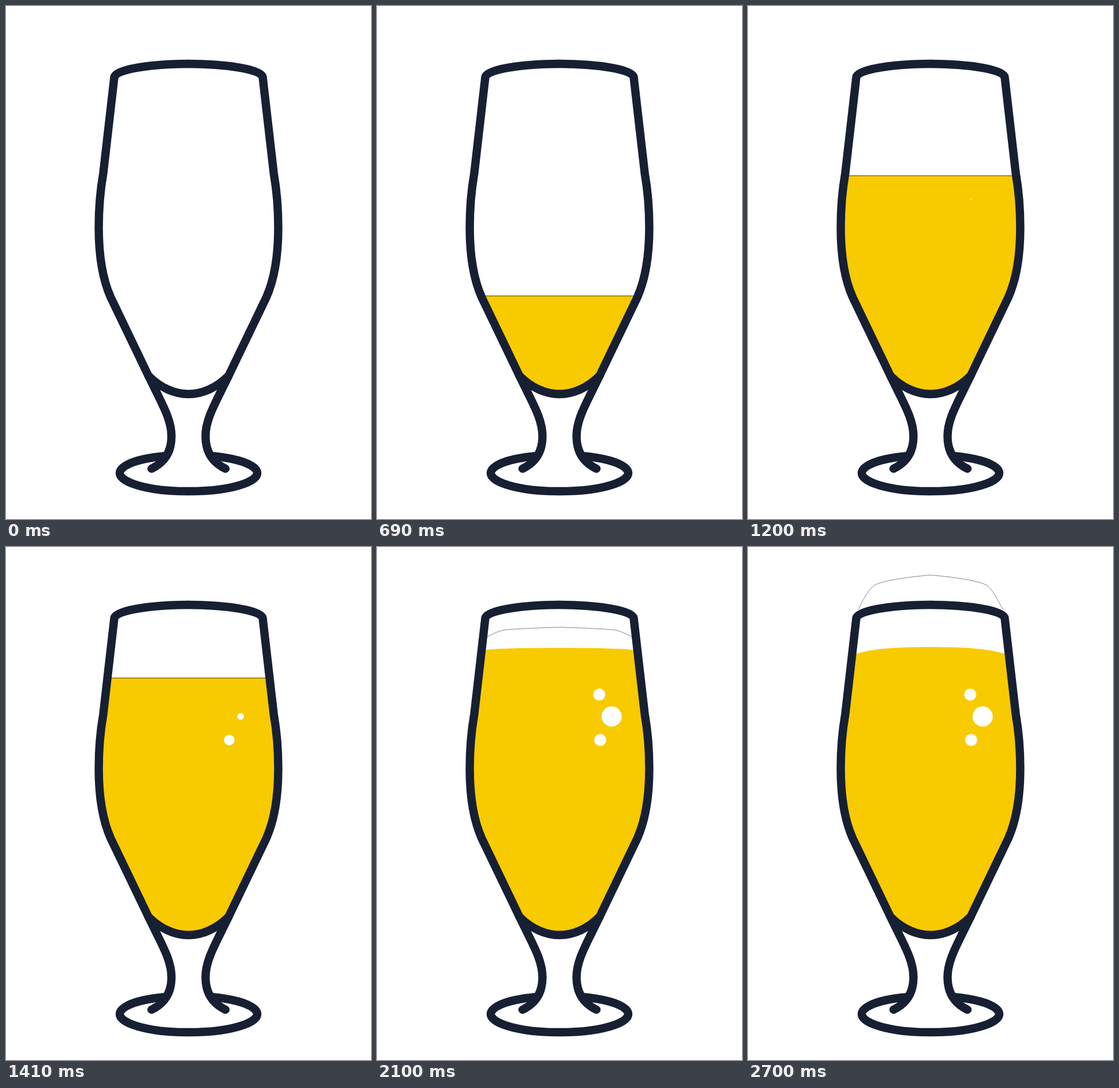
Recreate the animation shown at these times as an HTML page. Size 632x887 px, loop 3600 ms.

```html
<!DOCTYPE html>
<html lang="en">
<head>
<meta charset="utf-8">
<title>Filling beer glass</title>
<style>
  html, body { margin: 0; width: 100%; height: 100%; overflow: hidden; background: #fff; }
  svg { display: block; width: 632px; height: 887px; }
  .glass { fill: none; stroke: #171f33; stroke-width: 14.4; stroke-linecap: round; stroke-linejoin: round; }
  .hair { fill: none; stroke: #1c1c1c; }
</style>
</head>
<body>
<svg viewBox="0 0 632 887">
  <defs>
    <path id="bowl" d="M317 100H316C250 100 188.5 110 187.5 123L168.3 290C163 320 160.6 350 160.6 383C160.6 430 167 472 181.4 504L246.4 639C267 660 292 671 316 671H317Z"/>
    <clipPath id="inside">
      <use href="#bowl"/>
      <use href="#bowl" transform="matrix(-1 0 0 1 632 0)"/>
    </clipPath>
    <g id="half">
      <path d="M316 100C250 100 188.5 110 187.5 123L168.3 290C163 320 160.6 350 160.6 383C160.6 430 167 472 181.4 504L246.4 639C267 660 292 671 316 671"/>
      <path d="M246.4 639L256.8 660C270 688 286.5 715 286.5 744C286.5 768 277 788 252 800"/>
    </g>
  </defs>
  <g clip-path="url(#inside)">
    <path id="beer" fill="#f8ca00"/>
    <path id="level" class="hair" stroke-width=".8"/>
  </g>
  <g id="bubbles" fill="#fff"></g>
  <path id="foam" class="hair" stroke-width=".55"/>
  <g class="glass">
    <path stroke-linecap="butt" d="M277 777.8A119 31.5 0 1 0 355 777.8"/>
    <use href="#half"/>
    <use href="#half" transform="matrix(-1 0 0 1 632 0)"/>
  </g>
</svg>
<script>
  const LOOP = 3600, STEP = 30, HOLD = 60, LAST = 89;
  const $ = id => document.getElementById(id);
  const clamp = v => Math.max(0, Math.min(1, v));

  // step, surface height, rise per step
  const RISE = [
    [0, 665, 1.5], [15, 578, 9.8], [18, 547, 10.8], [28, 426, 12.4],
    [36, 327, 12], [39, 293, 11], [54, 178, 3.8], [55, 175, 2.2]
  ];
  // x, y, radius, first step, last step
  const BUBBLES = [
    [386.5, 333.7, 10.4, 38, 47],
    [406.3, 293, 17.5, 43, 52],
    [384.8, 255.2, 10.4, 47, 56]
  ];
  const dots = BUBBLES.map(([x, y]) => {
    const c = document.createElementNS("http://www.w3.org/2000/svg", "circle");
    c.setAttribute("cx", x);
    c.setAttribute("cy", y);
    return $("bubbles").appendChild(c);
  });

  function surface(k) {
    const i = RISE.findIndex(r => r[0] >= k);
    if (i < 0) return 175;
    if (i === 0) return RISE[0][1];
    const [k0, y0, v0] = RISE[i - 1], [k1, y1, v1] = RISE[i];
    const h = k1 - k0, u = (k - k0) / h, w = 1 - u;
    return y0 * w * w * (1 + 2 * u) + y1 * u * u * (3 - 2 * u)
      - h * v0 * u * w * w + h * v1 * u * u * w;
  }

  function foamPath(e) {
    const at = (x, y) => `${x} ${175 + (y - 175) * e} `;
    const l = 189 + 2 * e, r = 632 - l;
    return "M" + at(l, 108) +
      "C" + at(201, 88) + at(210, 70) + at(222, 64.5) +
      "C" + at(239, 57) + at(285, 51) + at(316, 48.5) +
      "C" + at(347, 51) + at(393, 57) + at(410, 64.5) +
      "C" + at(422, 70) + at(431, 88) + at(r, 108);
  }

  function draw(t) {
    const k = t < HOLD ? 0 : Math.min(LAST, Math.floor((t - HOLD) / STEP) + 1);
    const y = surface(k);
    const e = (1 - Math.cos(Math.PI * clamp((k - 57.8) / 31.2))) / 2;
    const edge = y + 10 * e, mid = y - 2 * e, bend = y + 0.5 * e;

    $("beer").setAttribute("d", k ? `M150 ${edge}H187C217 ${bend} 257 ${mid} 316 ${mid}` +
      `S415 ${bend} 445 ${edge}H482V680H150Z` : "");
    $("level").setAttribute("d", k && !e ? `M150 ${y + 0.5}H482` : "");
    $("foam").setAttribute("d", e ? foamPath(e) : "");
    BUBBLES.forEach(([, , r, a, b], i) =>
      dots[i].setAttribute("r", r * clamp((k - a) / (b - a))));
  }

  const start = performance.now();
  function tick() {
    draw((performance.now() - start) % LOOP);
    requestAnimationFrame(tick);
  }
  draw(0);
  requestAnimationFrame(tick);
</script>
</body>
</html>
```
